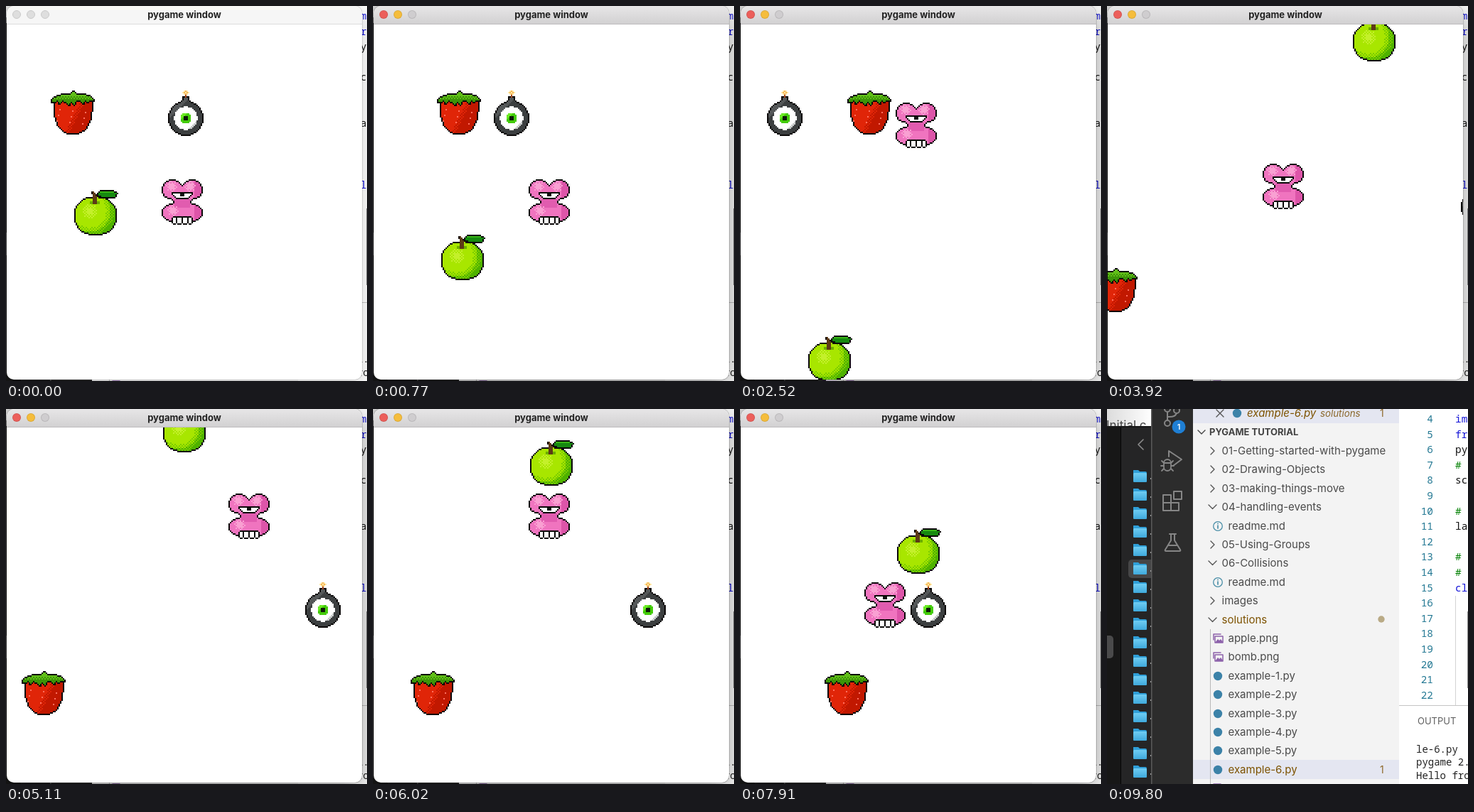
Write an HTML page with a canvas that moves like this. It is 508 by 528 pixels and loops after 9.87 s.

```html
<!DOCTYPE html>
<html lang="en">
<head>
<meta charset="utf-8">
<title>pygame window</title>
<style>
  html, body { margin: 0; width: 508px; height: 528px; overflow: hidden; background: #fff; }
  #stage { position: relative; width: 508px; height: 528px; overflow: hidden; }
  #ide { position: absolute; inset: 0; font-family: Inter, "Open Sans", sans-serif; }
  #ide text { white-space: pre; }
  .mono { font-family: "Noto Sans Mono", "DejaVu Sans Mono", monospace; }
  #win {
    position: absolute; left: 1px; top: 0; width: 500px; height: 526px;
    border-radius: 10px; overflow: hidden; background: #fff;
    box-shadow: 0 0 0 .5px rgba(0,0,0,.3), 0 8px 36px rgba(0,0,0,.42);
  }
  #win.idle { box-shadow: 0 0 0 .5px rgba(0,0,0,.2), 0 5px 24px rgba(0,0,0,.2); }
  #bar {
    height: 26px; box-sizing: border-box; border-bottom: 1px solid #bdbbbd;
    background: linear-gradient(#e7e6e7, #d2d1d2); color: #222;
    font: 700 13px/24px Inter, "Open Sans", sans-serif; text-align: center;
  }
  .idle #bar { background: #f6f6f6; border-color: #dcdcdc; }
  #bar i {
    position: absolute; top: 6px; width: 12px; height: 12px; box-sizing: border-box;
    border-radius: 50%; border: 1px solid rgba(0,0,0,.1);
  }
  #bar i:nth-of-type(1) { left: 8px; background: #ec5f5b; }
  #bar i:nth-of-type(2) { left: 28px; background: #f5bd3c; }
  #bar i:nth-of-type(3) { left: 48px; background: #cfcdcf; }
  .idle #bar i:nth-of-type(n) { background: #dedede; border-color: #c9c9c9; }
  #game { display: block; }
</style>
</head>
<body>
<div id="stage">
  <svg id="ide" width="508" height="528" viewBox="0 0 508 528"></svg>
  <div id="win" class="idle">
    <div id="bar"><i></i><i></i><i></i>pygame window</div>
    <canvas id="game" width="500" height="500"></canvas>
  </div>
</div>
<script>
const LOOP = 9870, STEP = 70, FOCUS = 140, CRASH = 7910, CLOSE = 8120;

// ---------- editor behind the game ----------
const rect = (x, y, w, h, fill, more = '') =>
  `<rect x="${x}" y="${y}" width="${w}" height="${h}" fill="${fill}" ${more}/>`;
const dot = (x, y, r, fill) => `<circle cx="${x}" cy="${y}" r="${r}" fill="${fill}"/>`;
const line = (d, color, w = 1.4) =>
  `<path d="${d}" fill="none" stroke="${color}" stroke-width="${w}" stroke-linecap="round" stroke-linejoin="round"/>`;
const label = (x, y, s, fill, size = 15, more = '') =>
  `<text x="${x}" y="${y}" fill="${fill}" font-size="${size}" ${more}>${s}</text>`;
const GOLD = '#7d5200', INK = '#4a4a4a', PY = '#3c82a8';

function finder() {
  let s = `<linearGradient id="sky"><stop stop-color="#dcdcdc"/><stop offset="1" stop-color="#fff"/></linearGradient>
    <linearGradient id="blue" x2="0" y2="1"><stop stop-color="#6fcdf3"/><stop offset="1" stop-color="#3fa9dc"/></linearGradient>` +
    rect(0, 0, 64, 25, 'url(#sky)') + label(-1, 29, 'Initial c', '#444', 17) +
    rect(0, 24, 64, 504, '#171717') + rect(20, 26, 43, 502, '#252526') +
    rect(19, 26, 1, 502, '#050505') +
    rect(-8, 319, 17, 32, '#4a4a4b', 'rx="5"') +
    rect(30, 212, 40, 26, '#464647', 'rx="5"') +
    line('M51 43L44 50L51 57', '#8b8b8b', 1.6);
  for (let i = 0; i < 17; i++) {
    const y = 86 + i * 26;
    s += `<path d="M37 ${y}h7l2 2h8q2 0 2 2v11q0 2-2 2h-15q-2 0-2-2z" fill="#2f9fd8"/>` +
      rect(37, y + 4, 19, 13, 'url(#blue)', 'rx="1.5"') + rect(61, y + 11, 2, 2, '#aaa');
  }
  return s;
}

function activityBar() {
  const c = '#868686';
  return rect(63, 0, 58, 528, '#2c2c2c') + rect(62, 0, 1.5, 528, '#5a5a5a') +
    line('M85 2V17M85 11Q98 12 98 4', c, 2) +
    `<g fill="#2c2c2c" stroke="${c}" stroke-width="2"><circle cx="85" cy="20" r="4"/><circle cx="85" cy="0" r="4"/><circle cx="98" cy="2" r="4"/></g>` +
    dot(101, 25, 9.5, '#1f7fd4') +
    label(101, 29, '1', '#fff', 11, 'text-anchor="middle" font-weight="600"') +
    line('M87 67V59L105 71L93 80', c, 2) +
    line('M80 76a5 5 0 0 1 10 0v6a5 5 0 0 1-10 0zM80 76h10M77 73l3 3M93 73l-3 3M76 80h4M90 80h4M77 87l3-3M93 87l-3-3', c, 1.8) +
    line('M79 121h11v11h11v11h-22zM79 132h11v11M94 116h11v11h-11z', c, 2) +
    line('M88 176h9M90 176v9l-8 13q-1 2 1 2h19q2 0 1-2l-8-13v-9M86 192h13', c, 2);
}

const tree = [
  ['>', '01-Getting-started-with-pygame'], ['>', '02-Drawing-Objects'],
  ['>', '03-making-things-move'], ['v', '04-handling-events'], ['i', 'readme.md'],
  ['>', '05-Using-Groups'], ['v', '06-Collisions'], ['i', 'readme.md'],
  ['>', 'images'], ['v', 'solutions'], ['p', 'apple.png'], ['p', 'bomb.png'],
  ...[1, 2, 3, 4, 5, 6].map(n => ['y', `example-${n}.py`]), ['p', 'player.png']
];

const icons = {
  '>': y => line(`M146 ${y - 5}l5 5l-5 5`, '#555'),
  'v': y => line(`M143 ${y - 3}l5.5 5.5l5.5-5.5`, '#555'),
  'i': y => `<circle cx="156" cy="${y}" r="6.3" fill="none" stroke="#4b8fa8" stroke-width="1.3"/>` +
    line(`M156 ${y - 1}v4M156 ${y - 3.6}v.2`, '#4b8fa8', 1.7),
  'p': y => line(`M150 ${y + 2}v-8h10M152 ${y - 3}h11v9h-11z`, '#8d62ab', 1.5) +
    `<path d="M152 ${y + 6}l4-5l2 2l2-2l3 4v1z" fill="#8d62ab"/>`,
  'y': y => dot(156, y, 6.2, PY)
};

function explorer() {
  let s = rect(121, 0, 290, 528, '#f3f3f3') + rect(121, 0, 290, 20, '#e4e6f1') +
    rect(121, 494, 290, 27, '#e4e6f1') +
    line('M154 1l10 10M164 1l-10 10', '#555') + dot(183, 6, 6.2, PY) +
    label(197, 11, 'example-6.py', GOLD, 15, 'font-style="italic"') +
    label(300, 11, 'solutions', '#8a672a', 13.3, 'font-style="italic"') +
    label(384, 11, '1', '#8e692a', 14) +
    line('M128 30l5 5l5-5', '#444') +
    label(144, 37, 'PYGAME TUTORIAL', '#424242', 13, 'font-weight="700"') +
    rect(145, 310, 1, 218, '#b8b8b8') + dot(386, 296, 4.7, '#b9aa85');
  tree.forEach(([kind, name], i) => {
    const y = Math.round(59 + i * 26.4);
    const gold = name === 'solutions' || name === 'example-6.py';
    s += icons[kind](y) + label('>v'.includes(kind) ? 161.5 : 170.5, y + 5.3, name, gold ? GOLD : INK);
  });
  return s + label(384, 513, '1', '#8e692a', 14);
}

function editor() {
  const code = { 4: 'im', 5: 'fr', 6: 'py', 7: '#', 8: 'sc', 10: '#', 11: 'la', 13: '#', 14: '#', 15: 'cl' };
  const color = s => s === '#' ? '#008000' : /im|fr|cl/.test(s) ? '#1414d8' : '#111';
  let s = rect(411, 0, 97, 528, '#fff');
  for (let n = 4; n <= 22; n++) {
    const y = 19 + (n - 4) * 21.6;
    s += label(459, y, n, '#237893', 14.4, 'class="mono" text-anchor="end"');
    if (code[n]) s += label(490, y, code[n], color(code[n]), 14.4, 'class="mono"');
  }
  s += rect(490, 263, 1, 154, '#d3d3d3') + rect(507, 285, 1, 108, '#8f8f8f') +
    rect(411, 417, 97, 1, '#c4c4c4') + label(437, 444, 'OUTPUT', '#5f5f5f', 13);
  ['le-6.py', 'pygame 2.', 'Hello fro', '499 498 4'].forEach((t, i) =>
    s += label(435, 484 + i * 18.3, t, '#222', 14, 'class="mono"'));
  return s;
}

document.getElementById('ide').innerHTML = finder() + activityBar() + explorer() + editor();

// ---------- pixel sprites, 32 x 32 cells ----------
const ell = (cx, cy, rx, ry = rx, p = 2) => (x, y) =>
  Math.abs((x - cx) / rx) ** p + Math.abs((y - cy) / ry) ** p <= 1;
const box = (x0, y0, x1, y1) => (x, y) => x > x0 && x < x1 && y > y0 && y < y1;
const any = (...shapes) => (x, y) => shapes.some(f => f(x, y));
const below = (top, f) => (x, y) => y > top && f(x, y);
const probe = document.createElement('canvas').getContext('2d');
const poly = d => {
  const path = new Path2D(d);
  return (x, y) => probe.isPointInPath(path, x, y);
};
const mix = (x, y) => (Math.floor(x) + Math.floor(y)) % 2 ? .07 : -.07;

// Each layer is [shape, colour or colour function, outlined].
function sprite(...layers) {
  const cv = document.createElement('canvas');
  cv.width = cv.height = 32;
  const c = cv.getContext('2d');
  for (const [inside, paint, outlined] of layers)
    for (let j = 0; j < 32; j++) for (let i = 0; i < 32; i++) {
      const x = i + .5, y = j + .5;
      if (!inside(x, y)) continue;
      const edge = outlined && !(inside(x - 1, y) && inside(x + 1, y) && inside(x, y - 1) && inside(x, y + 1));
      c.fillStyle = edge ? '#0b0808' : typeof paint === 'string' ? paint : paint(x, y);
      c.fillRect(i, j, 1, 1);
    }
  return cv;
}

const apple = sprite(
  [ell(16, 18.2, 15.2, 13.8, 2.2), (x, y) => {
    const d = Math.hypot(x - 12, y - 15) / 19 + mix(x, y);
    return d < .2 ? '#c4f02a' : d < .68 ? '#a8e600' : d < .82 ? '#7ccd00' : '#4fb200';
  }, true],
  [ell(15.5, 9, 3.5, 1.4), '#6cae00'],
  [poly('M16 3L19 .4H29L32 2.5L30 6H21L17 4Z'), (x, y) => y < 2.5 ? '#37b514' : '#168a10', true],
  [poly('M12.4 1H15L16.6 4V9.5H14V4Z'), x => x < 14.5 ? '#16100a' : '#5d3a16']
);

const leaf = poly('M0 6L3 4L8 2H14L15 0H17L18 2H23L28 3.5L31 7V8.5L28 8L26 9L24.5 8L23 10.5L21 8.5L18.5 8L17 11.5L14.5 8.5L13 12L10.5 9L8 8L6 10.5L4.5 8L2 9.3L0 8.5Z');
const strawberry = sprite(
  [below(6, ell(15.7, 10, 14, 21, 2.4)), (x, y) => {
    const seed = (Math.floor(x) * 7 + Math.floor(y) * 11) % 37;
    if (seed === 0 && y > 12 && y < 25) return '#ff705f';
    return (x - 14) / 20 + (y - 16) / 40 + mix(x, y) > .22 ? '#c11800' : '#e02508';
  }, true],
  [leaf, (x, y) => y < 5 + mix(x, y) * 10 ? '#61bf18' : '#3c9408', true]
);

const bomb = sprite(
  [any(box(10, 4, 15, 9), ell(12.5, 19.5, 12.5)), (x, y) => x + y < 21 ? '#555859' : '#3c3f40', true],
  [ell(12.5, 19.5, 8.2), (x, y) => x + y > 41.5 ? '#c9cccc' : '#fff'],
  [ell(12.5, 19.5, 3.7), (x, y) => x + y < 30 ? '#6bea24' : '#43cb08'],
  [box(11, 18, 14, 21), '#0d1b08'],
  [box(12, 2, 13, 5), '#a5461d'],
  [any(box(11, 0, 14, 1), box(10, 1, 15, 2), box(11, 2, 14, 3)), (x, y) =>
    mix(x, y) > 0 ? '#ffe9a6' : '#f5b455']
);

const body = any(ell(7.6, 7.3, 7.6, 7.1), ell(21.4, 7.3, 7.6, 7.1),
  ell(7, 23.5, 7, 6.2), ell(22, 23.5, 7, 6.2),
  poly('M5 12L8.5 15.5V17L4 20V27H25V20L20.5 17V15.5L24 12V8L18 4H11L5 8Z'));
const tooth = (cx, half) => [ell(cx, 29, half, 2.98, 3), '#fff', true];
const player = sprite(
  [body, (x, y) => {
    const glow = Math.min(Math.hypot(x - 7, y - 5), Math.hypot(x - 20, y - 5), Math.hypot(x - 8, y - 22));
    return glow < 3 + mix(x, y) * 8 ? '#f9a0d2' : Math.abs(x - 14.5) < 6 && y > 14 && y < 20 ? '#e15caf' : x > 23 ? '#dd55a9' : '#f074bf';
  }, true],
  [below(9, ell(14.5, 9, 7.6, 5.4)), '#fff', true],
  [box(13, 10, 16, 12), '#111'],
  [box(8, 26, 21, 27), '#111'],
  tooth(9, 2), tooth(20, 2), tooth(12.5, 2.5), tooth(16.5, 2.5)
);

// ---------- motion ----------
// Legs: start ms, x, y, px/s in x, px/s in y.
const paths = {
  apple: [[0, 93, 233, 0, 81.5], [3290, 343, -64, 0, 82.5], [4430, 218, -64, 0, 51.5], [6150, 218, -64, 0, 117]],
  strawberry: [[0, 62, 93, 34.9, 0], [2660, -64, 343, 34.6, 0]],
  bomb: [[0, 227, 93, -75.3, 0], [3860, 501, 218, -64.6, 0]]
};
// Key presses: ms, then the lane that becomes the goal.
const keys = [[1283, 343, 218], [1900, 218, 218], [2320, 218, 93], [3749, 218, 218], [4080, 218, 93],
  [4250, 343, 93], [5082, 218, 93], [6200, 93, 93], [6631, 93, 218], [7807, 218, 218]];

function drift(legs, t) {
  const [t0, x, y, vx, vy] = legs.filter(l => l[0] <= t).pop();
  const s = (t - t0) / 1000;
  return [x + vx * s, y + vy * s];
}

// A quarter of the remaining way is covered 35 times a second.
function chase(t) {
  let pos = [218, 218], goal = pos, last = 0;
  const ease = dt => pos.map((p, i) => goal[i] + (p - goal[i]) * .75 ** (dt * .035));
  for (const [at, ...next] of keys) {
    if (at > t) break;
    pos = ease(at - last);
    goal = next;
    last = at;
  }
  return ease(t - last);
}

const win = document.getElementById('win');
const ctx = document.getElementById('game').getContext('2d');
ctx.imageSmoothingEnabled = false;
const put = (art, [x, y]) => ctx.drawImage(art, Math.round(x), Math.round(y), 64, 64);
const start = performance.now();

function draw() {
  const now = (performance.now() - start) % LOOP;
  const t = Math.floor(now / STEP) * STEP;
  win.style.visibility = t < CLOSE ? 'visible' : 'hidden';
  win.className = t < FOCUS ? 'idle' : '';
  const g = Math.min(t, CRASH);
  ctx.clearRect(0, 0, 500, 500);
  put(apple, drift(paths.apple, g));
  put(strawberry, drift(paths.strawberry, g));
  put(player, chase(g));
  put(bomb, drift(paths.bomb, g));
  requestAnimationFrame(draw);
}
draw();
</script>
</body>
</html>
```
